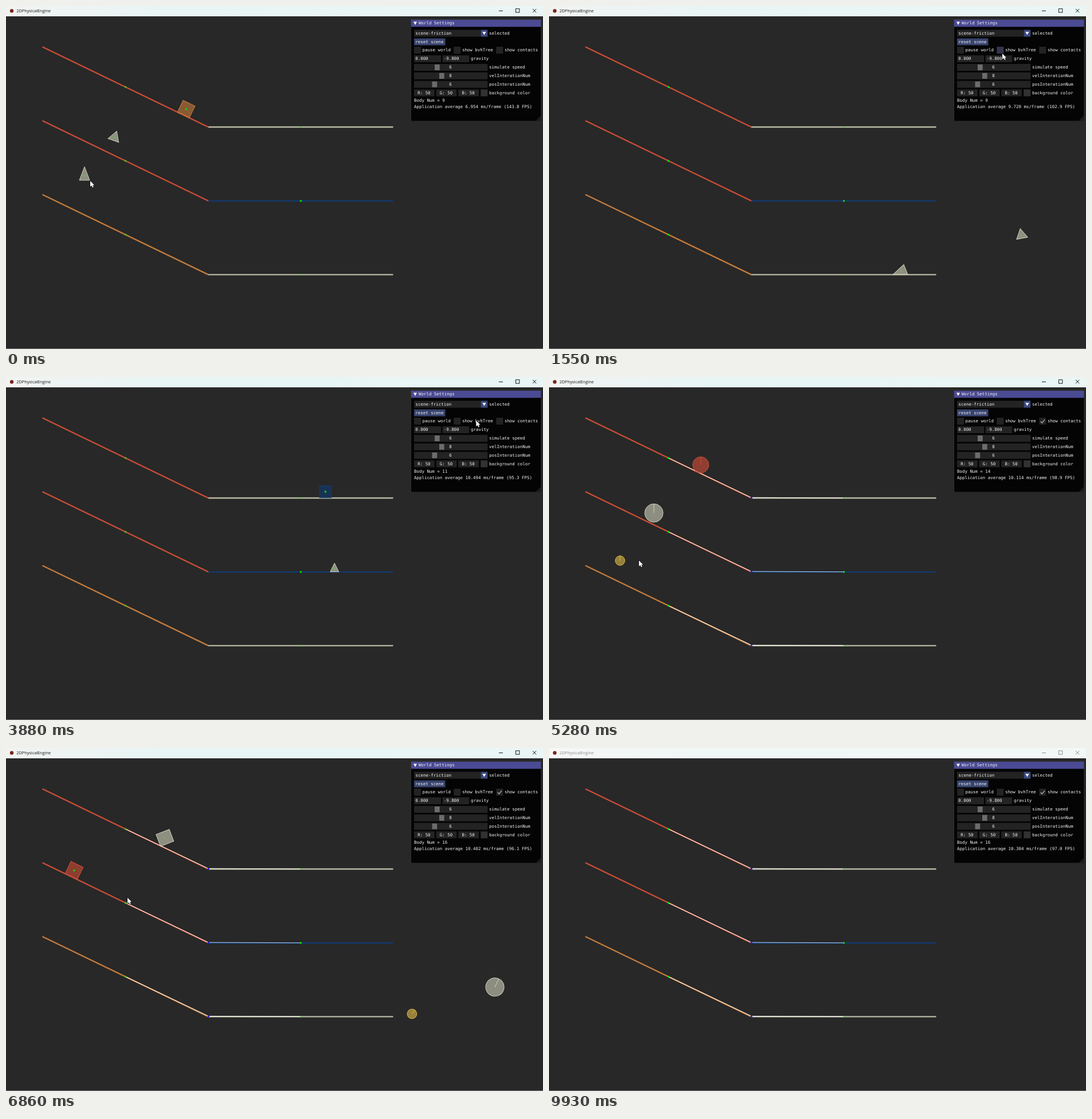
An HTML page with a canvas that plays this animation: 937x598 px, repeating every 9.95 s.

```html
<!DOCTYPE html>
<html lang="en">
<head>
<meta charset="utf-8">
<title>2DPhysicalEngine</title>
<style>
html, body { margin: 0; width: 100%; height: 100%; overflow: hidden; background: #282828; }
canvas { display: block; width: 937px; height: 598px; }
</style>
</head>
<body>
<canvas id="stage" width="937" height="598"></canvas>
<script>
const ctx = document.getElementById('stage').getContext('2d');
const W = 937, H = 598, LOOP = 9.95;
const G = 1809, COS = 0.9, SIN = 0.436, TAN = 0.484, SLOPE = 25.8;
const LEFT = 64, CORNER = 353, EDGE = 675.5;
const PAUSE = 7.94, RESUME = 8.51;
const RED = '#cf4e37', WHITE = '#cfcfba', PALE = '#b9b9a5', ORANGE = '#c67c3c',
      BLUE = '#113a70', YELLOW = '#ddb948', GREEN = '#00e000';

const rows = [
  { top: 71.5, base: 211, slope: RED, flat: PALE },
  { top: 200.3, base: 339.8, slope: RED, flat: BLUE },
  { top: 329, base: 468.4, slope: ORANGE, flat: PALE }
];

const square = (w, h = w) => [[-w, -h], [w, -h], [w, h], [-w, h]];
const triangle = (half, height) =>
  [[0, -height * 2 / 3], [half, height / 3], [-half, height / 3]];

// t: release time, a: acceleration on the slope, d: deceleration on the flat
const bodies = [
  { t: 0, x: 314, v: 505, row: 0, h: 11.6, pts: square(11.5), color: ORANGE, r0: SLOPE, spin: 25 },
  { t: 0, x: 189.3, y: 229, row: 1, h: 5.8, pts: triangle(9.8, 17), color: WHITE, r0: 20, spin: -41 },
  { t: 0, x: 137, y: 296, v: -64, a: 545, d: 271, row: 2, h: 6, pts: triangle(9, 23.5),
    color: WHITE, r0: 110.6, rest: -110.6, rock: -4, spin: 60 },
  { t: 2.58, x: 215, a: 500, row: 0, h: 11, pts: square(10.5), color: BLUE, r0: SLOPE, spin: 30 },
  { t: 2.77, x: 168.3, y: 235, row: 1, h: 5.2, pts: triangle(7.5, 15), color: WHITE, r0: 0, spin: -30 },
  { t: 4.655, x: 130, y: 77, row: 0, h: 14, round: true, color: RED, spin: 60 },
  { t: 5.2625, x: 183, y: 236.8, row: 1, h: 16, round: true, color: WHITE, spin: 80 },
  { t: 5.27, x: 124, y: 320, a: 526, row: 2, h: 8.3, round: true, color: YELLOW, roll: 0.1144 },
  { t: 6.397, x: 234, y: 57, v: 30, a: 400, d: 74, row: 0, h: 11.4, pts: square(12.3, 11),
    color: WHITE, r0: 0, tilt: -21, hop: 6, spin: 30 },
  { t: 6.775, x: 117, a: 560, d: 253, row: 1, h: 12, pts: square(11.8), color: RED,
    r0: SLOPE, rock: -9, spin: 40 }
];

// Drop, slide down the slope, run along the flat, then free fall.
function locate(b, now) {
  let s = now - b.t;
  if (s < 0) return null;
  const { a = G * SIN, d = 0, v = 0, r0 = 0, rest = 0, rock = 0, spin = 0, roll = 0 } = b;
  const tilt = b.tilt ?? (b.round ? 0 : SLOPE);
  const row = rows[b.row];
  const land = row.top + (b.x - LEFT) * TAN - b.h / COS;
  const start = Math.min(b.y ?? land, land);
  const tFall = Math.sqrt(2 * (land - start) / G);
  const pose = (x, y, turn, dist) => ({ x, y, angle: (rest + turn) * Math.PI / 180 + dist * roll });
  if (s < tFall) return pose(b.x, start + G * s * s / 2, r0, 0);

  s -= tFall;
  const bend = CORNER + 0.229 * b.h, run = (bend - b.x) / COS;
  const v0 = v + G * tFall * SIN, v1 = Math.sqrt(v0 * v0 + 2 * a * run), tSlope = (v1 - v0) / a;
  if (s < tSlope) {
    const q = v0 * s + a * s * s / 2;
    const lift = (b.hop || 0) * Math.sin(Math.PI * q / run);
    return pose(b.x + q * COS, land + q * SIN - lift, r0 + (tilt - r0) * Math.min(1, s / 0.13), q);
  }

  s -= tSlope;
  const floor = row.base - b.h, length = EDGE - bend;
  const v2 = Math.sqrt(v1 * v1 - 2 * d * length), tFlat = 2 * length / (v1 + v2);
  if (s < tFlat) {
    const q = v1 * s - d * s * s / 2, k = Math.exp(-s / 0.03);
    const sway = rock * (1 - k) * Math.exp(-2 * s);
    return pose(bend + q, floor + sway * 0.25, tilt * k + sway, run + q);
  }

  s -= tFlat;
  return pose(EDGE + v2 * s, floor + G * s * s / 2,
    rock * Math.exp(-2 * tFlat) + spin * s, run + length + v2 * s);
}

function track(keys, t) {
  const i = keys.findIndex(k => k[0] > t);
  if (i < 0) return keys[keys.length - 1].slice(1);
  if (i === 0) return keys[0].slice(1);
  const p = keys[i - 1], q = keys[i], u = (t - p[0]) / (q[0] - p[0]);
  return p.slice(1).map((n, j) => n + (q[j + 1] - n) * u);
}

const pointerKeys = [
  [0, 147, 305], [0.4, 147, 305], [0.95, 775, 92], [1.55, 791, 83], [1.75, 788, 77], [2, 788, 77],
  [2.45, 195, 88], [2.75, 196, 234], [3, 196, 234], [3.5, 788, 76], [3.75, 788, 76],
  [4.05, 862, 76], [4.25, 862, 76], [4.62, 150, 85], [4.9, 160, 130], [5.25, 157, 320],
  [5.6, 157, 320], [6.35, 222, 70], [6.7, 212, 261], [7.1, 212, 261], [7.8, 725, 75],
  [8.6, 725, 75], [9.1, 730, 150], [9.7, 548, 600]
];
const frameTimes = [
  [0, 6.952], [1.55, 9.719], [2.8, 10.787], [5.28, 10.114], [6.86, 10.402], [8.02, 10.069], [9.93, 10.304]
];

function line(x1, y1, x2, y2, color, width) {
  ctx.strokeStyle = color;
  ctx.lineWidth = width;
  ctx.beginPath();
  ctx.moveTo(x1, y1);
  ctx.lineTo(x2, y2);
  ctx.stroke();
}

function box(x, y, w, h, color) {
  ctx.fillStyle = color;
  ctx.fillRect(x, y, w, h);
}

function trace(pts) {
  ctx.beginPath();
  pts.forEach(p => ctx.lineTo(...p));
  ctx.closePath();
}

function polygon(pts, color) {
  trace(pts);
  ctx.fillStyle = color;
  ctx.fill();
}

const dot = (x, y, color, size = 3) => box(x - size / 2, y - size / 2, size, size, color);

function drawTracks(contacts) {
  const mid = (LEFT + CORNER) / 2, flatMid = 514.5;
  for (const r of rows) {
    const half = (r.top + r.base) / 2;
    line(CORNER, r.base, EDGE, r.base, r.flat, 2.3);
    line(LEFT - 0.5, r.top - 0.3, CORNER, r.base, r.slope, 2.3);
    if (contacts) {
      line(mid, half, CORNER, r.base - 0.8, '#fff0e4', 1.1);
      line(CORNER, r.base - 0.8, flatMid, r.base, r.flat === BLUE ? '#b5d6ff' : '#fffff4', 1.1);
      dot(CORNER + 0.3, r.base - 0.5, '#2418e8', 3);
    }
    dot(mid, half, GREEN, 3);
    dot(flatMid, r.base, r.flat === BLUE ? GREEN : '#52d646', r.flat === BLUE ? 3 : 2.3);
  }
}

function drawBody(b, p) {
  ctx.save();
  ctx.translate(p.x, p.y);
  ctx.rotate(p.angle);
  if (b.round) {
    ctx.beginPath();
    ctx.arc(0, 0, b.h, 0, 7);
  } else trace(b.pts);
  ctx.fillStyle = ctx.strokeStyle = b.color;
  ctx.globalAlpha = 0.61;
  ctx.fill();
  ctx.globalAlpha = 1;
  ctx.lineWidth = 1;
  ctx.stroke();
  if (b.round) line(0, 0, 0, -b.h, b.color, 1);
  else if (b.color === WHITE) dot(0, 0, '#62c452', 2.2);
  else dot(0, 0, GREEN, 3);
  ctx.restore();
}

const union = (a, b) =>
  [Math.min(a[0], b[0]), Math.min(a[1], b[1]), Math.max(a[2], b[2]), Math.max(a[3], b[3])];

function bounds(b, p) {
  const c = Math.cos(p.angle), s = Math.sin(p.angle);
  const ex = Math.max(...b.pts.map(([x, y]) => Math.abs(x * c - y * s)));
  const ey = Math.max(...b.pts.map(([x, y]) => Math.abs(x * s + y * c)));
  return [p.x - ex - 3, p.y - ey - 3, p.x + ex + 1, p.y + ey + 1];
}

function drawTree(visible) {
  const far = 1200;
  const slopes = rows.map(r => [19, r.top - 21.5, 397, r.base + 21.5]);
  const flats = rows.map(r => [305, r.base - 1, 724, r.base + 1]);
  const moving = visible.map(({ b, p }) => bounds(b, p));
  const nodes = [...slopes, ...flats, ...moving, union(slopes[0], slopes[2]), union(flats[0], flats[1]),
    [305, 210, far, far], [305, flats[2][1], far, far], [19, 50, far, far]];
  if (moving.length > 1) {
    const pair = moving.reduce(union);
    nodes.push(pair, union(pair, slopes[0]));
  }
  ctx.strokeStyle = '#00d400';
  ctx.lineWidth = 1;
  for (const [x1, y1, x2, y2] of nodes) {
    const x = Math.floor(x1) + 0.5, y = Math.floor(y1) + 0.5;
    ctx.strokeRect(x, y, Math.floor(x2) + 0.5 - x, Math.floor(y2) + 0.5 - y);
  }
}

function label(text, x, y, align = 'left') {
  ctx.font = '7.45px "DejaVu Sans Mono", monospace';
  ctx.textAlign = align;
  ctx.textBaseline = 'middle';
  ctx.fillStyle = '#f4f4f4';
  ctx.fillText(text, x, y + 0.3);
}

function drawPanel(t, pointer, checks) {
  const FIELD = '#232323';
  box(706.5, 23.5, 227.5, 177.5, '#3b3b40');
  box(707, 24, 226.5, 176.5, '#040404');
  box(707, 24, 226.5, 12.3, '#4b4b95');
  polygon([[711, 27.5], [717, 27.5], [714, 33]], '#fff');
  label('World Settings', 720, 30);

  box(712, 41.5, 116.5, 12, FIELD);
  box(828.5, 41.5, 11.8, 12, '#3d4a80');
  polygon([[831.3, 45], [837.5, 45], [834.4, 50.5]], '#fff');
  label('scene-friction', 714.5, 47.5);
  label('selected', 843, 47.5);
  box(712, 56.5, 54.5, 12, '#38446f');
  label('reset scene', 714.3, 62.5);

  const names = ['pause world', 'show bvhTree', 'show contacts'];
  [712, 781.3, 855.3].forEach((x, i) => {
    const hover = pointer[1] > 70 && pointer[1] < 83 && pointer[0] > x && pointer[0] < x + 14;
    box(x, 71, 12, 12, hover ? '#34344f' : FIELD);
    if (checks[i]) {
      ctx.strokeStyle = '#b4b4b4';
      ctx.lineWidth = 1.3;
      ctx.beginPath();
      [[2.5, 6.5], [5, 9], [9.7, 3.3]].forEach(([dx, dy]) => ctx.lineTo(x + dx, 71 + dy));
      ctx.stroke();
    }
    label(names[i], x + 14.6, 77);
  });

  box(712, 86, 47, 12, FIELD);
  box(761.5, 86, 46.7, 12, FIELD);
  label('0.000', 714.2, 92);
  label('-9.800', 763.7, 92);
  label('gravity', 811, 92);

  [['simulate speed', 6, 748], ['velInterationNum', 8, 756], ['posInterationNum', 6, 743.5]]
    .forEach(([name, value, grab], i) => {
      const y = 101 + i * 14.8;
      box(712, y, 128.3, 12, FIELD);
      box(grab, y + 1, 8.7, 10, '#6c6c6c');
      label(value, 775.5, y + 6, 'center');
      label(name, 843, y + 6);
    });

  ['R', 'G', 'B'].forEach((c, i) => {
    box(712 + i * 38.6, 145.4, 35.8, 12, FIELD);
    label(c + ': 50', 729.4 + i * 38.6, 151.5, 'center');
  });
  box(828.3, 145.4, 12, 12, '#323232');
  label('background color', 843, 151.5);

  const ms = track(frameTimes, t)[0];
  const count = 6 + bodies.filter(b => b.t <= t).length;
  label(`Body Num = ${count}`, 712, 164.3);
  label(`Application average ${ms.toFixed(3)} ms/frame (${(1000 / ms).toFixed(1)} FPS)`, 712, 175.3);
  polygon([[933, 191.5], [933, 200], [924.5, 200]], '#1c1c1f');
}

function drawTitleBar(active) {
  const shade = ctx.createLinearGradient(0, 0, W, 0);
  shade.addColorStop(0, active ? '#f1f3f2' : '#f6f7f6');
  shade.addColorStop(0.3, active ? '#e8f5f5' : '#f0f7f7');
  shade.addColorStop(1, active ? '#e9f6f5' : '#f1f8f7');
  box(0, 0, W, 18, shade);
  ctx.fillStyle = '#7b261d';
  ctx.beginPath();
  ctx.arc(10, 8.5, 3.2, 0, 7);
  ctx.fill();
  const ink = active ? '#181818' : '#8c8c8c';
  ctx.font = '7.3px "Open Sans", sans-serif';
  ctx.textAlign = 'left';
  ctx.textBaseline = 'middle';
  ctx.fillStyle = ink;
  ctx.fillText('2DPhysicalEngine', 18.3, 8.6);
  line(860, 8.5, 867, 8.5, ink, 1);
  ctx.strokeRect(889.5, 4.8, 6.3, 6.3);
  line(919, 5, 925.3, 11.3, ink, 1);
  line(925.3, 5, 919, 11.3, ink, 1);
}

function drawPointer([x, y]) {
  const shape = [[0, 0], [0, 10], [2.4, 7.9], [4, 11.4], [5.7, 10.6], [4.2, 7.2], [7.2, 7.2]];
  trace(shape.map(([dx, dy]) => [x + dx, y + dy]));
  ctx.strokeStyle = '#111';
  ctx.lineWidth = 1.2;
  ctx.stroke();
  ctx.fillStyle = '#fff';
  ctx.fill();
}

function draw(t) {
  const world = t < PAUSE ? t : Math.max(PAUSE, t - RESUME + PAUSE);
  const paused = t >= PAUSE && t < RESUME, tree = t >= 1.78 && t < 3.6, contacts = t >= 4.15;
  const pointer = track(pointerKeys, t);
  const visible = bodies.map(b => ({ b, p: locate(b, world) }))
    .filter(({ p }) => p && p.x < W + 25 && p.y < H + 25);

  box(0, 0, W, H, '#282828');
  drawTracks(contacts);
  visible.forEach(({ b, p }) => drawBody(b, p));
  if (tree) drawTree(visible);
  box(0, 597, W, 1, '#707070');
  drawPanel(t, pointer, [paused, tree, contacts]);
  drawTitleBar(t < 9.72);
  drawPointer(pointer);
}

function tick() {
  draw(performance.now() / 1000 % LOOP);
  requestAnimationFrame(tick);
}
tick();
</script>
</body>
</html>
```
